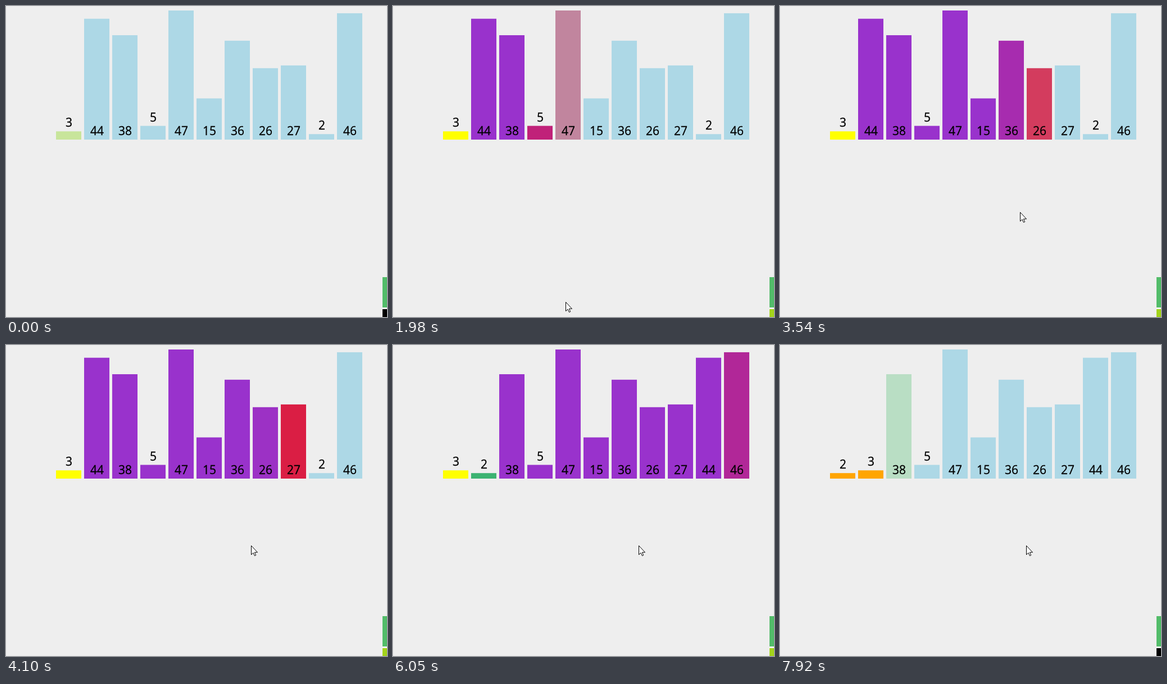
An HTML page with a canvas that plays this animation: 678x554 px, repeating every 8000 ms.

```html
<!DOCTYPE html>
<html lang="en">
<head>
<meta charset="utf-8">
<title>Quicksort partition</title>
<style>
html, body { margin: 0; width: 100%; height: 100%; overflow: hidden; background: #eee; }
canvas { display: block; }
</style>
</head>
<body>
<canvas id="stage" width="678" height="554"></canvas>
<script>
const ctx = document.getElementById('stage').getContext('2d');

const LOOP = 8000, CADENCE = 76.9;
const FIRST = -130, BEAT = 496.9, FADE = 300;
const BASE = 238, LEFT = 89, PITCH = 50, WIDTH = 45, UNIT = 230 / 47;

const BLUE = [173, 216, 230], YELLOW = [255, 255, 0], RED = [220, 20, 60],
      PURPLE = [153, 50, 204], GREEN = [60, 179, 113], ORANGE = [255, 165, 0];

const bars = [3, 44, 38, 5, 47, 15, 36, 26, 27, 2, 46].map((value, i) => ({
  value, color: [{ to: BLUE }], slot: [{ to: [i] }]
}));

const ease = u => u < 0.5 ? 4 * u ** 3 : 1 - 4 * (1 - u) ** 3;
const clamp = u => Math.max(0, Math.min(1, u));
const mix = (a, b, u) => a.map((v, i) => v + (b[i] - v) * u);

// Run one quicksort partition and record every change with its beat.
function sort() {
  const order = [...bars];
  let beat = 0;

  const paint = (b, to) => b.color.push({ beat, to });
  const swap = (i, j) => {
    [order[i], order[j]] = [order[j], order[i]];
    for (const k of [i, j]) order[k].slot.push({ beat, to: [k] });
  };

  const pivot = order[0];
  let store = 0;
  paint(pivot, YELLOW);
  beat++;

  for (let i = 1; i < order.length; i++) {
    const b = order[i];
    paint(b, RED);
    beat++;
    if (b.value > pivot.value) {
      paint(b, PURPLE);
    } else {
      swap(++store, i);
      beat++;
      paint(b, GREEN);
    }
  }

  beat++;
  swap(0, store);
  beat++;
  for (const b of order) paint(b, b === pivot ? ORANGE : BLUE);

  // The left part is a single bar; the right part gets the next pivot.
  beat++;
  paint(order[0], ORANGE);
  beat++;
  paint(order[store + 1], YELLOW);
}

function valueAt(track, t) {
  return track.slice(1).reduce((now, { beat, to }) =>
    mix(now, to, ease(clamp((t - FIRST - beat * BEAT) / FADE))), track[0].to);
}

// Pointer key points: time, x, y.
const path = [
  [530, 328, 548], [670, 307, 527], [2720, 307, 527],
  [3000, 349, 455], [3600, 436, 357], [7000, 438, 357]
];

function pointerAt(t) {
  const k = path.findIndex(p => p[0] > t);
  if (k < 0) return path[path.length - 1].slice(1);
  const a = path[k - 1], b = path[k];
  return mix(a, b, (t - a[0]) / (b[0] - a[0])).slice(1).map(Math.round);
}

const arrow = new Path2D('M.5 .5V16.5L4 13.2 6.5 18.5 8.7 17.5 6.4 12.3H11.5Z');

function drawPointer(t) {
  if (t < path[0][0]) return;
  const [x, y] = pointerAt(t);
  ctx.save();
  ctx.translate(x, y);
  ctx.lineWidth = 1;
  ctx.fillStyle = '#fff';
  ctx.fill(arrow);
  ctx.stroke(arrow);
  ctx.restore();
}

function box(color, x, y, w, h) {
  ctx.fillStyle = color;
  ctx.fillRect(x, y, w, h);
}

function drawBar(b, t) {
  const x = LEFT + PITCH * valueAt(b.slot, t)[0];
  const h = b.value * UNIT;
  box(`rgb(${valueAt(b.color, t).map(Math.round)})`, x, BASE - h, WIDTH, h);

  const labelX = x + WIDTH / 2 + 0.5;
  const labelY = Math.round(h < 40 ? BASE - h : BASE) - 8;
  ctx.fillStyle = '#000';
  ctx.lineWidth = 0.3;
  ctx.fillText(b.value, labelX, labelY);
  ctx.strokeText(b.value, labelX, labelY);
}

function draw(t) {
  box('#eee', 0, 0, 678, 554);
  for (const b of bars) drawBar(b, t);

  const running = t >= 360 && t < 7300;
  box('#52bc69', 670, 483, 8, 54);
  box('#f6f6f6', 670, 537, 8, 3);
  box(running ? '#a3d31c' : '#000', 670, 540, 8, 14);
  drawPointer(t);
}

function tick() {
  const t = performance.now() % LOOP;
  draw(Math.floor((t + 20) / CADENCE) * CADENCE);
  requestAnimationFrame(tick);
}

ctx.font = '21px "Open Sans", "Noto Sans", sans-serif';
ctx.textAlign = 'center';
ctx.lineJoin = 'round';
ctx.strokeStyle = '#000';
sort();
tick();
</script>
</body>
</html>
```
